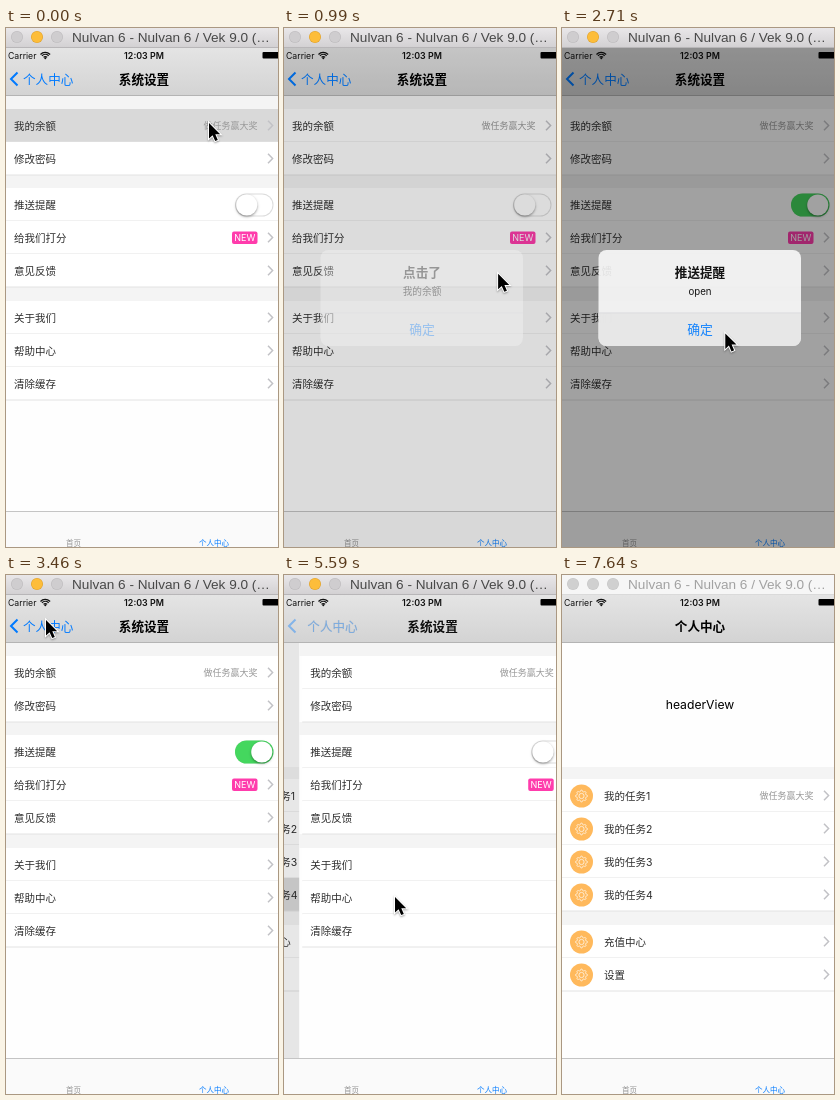
Write an HTML page with a canvas that moves like this. It is 272x519 px and loops after 7660 ms.

```html
<!DOCTYPE html>
<html lang="zh-CN">
<head>
<meta charset="utf-8">
<title>系统设置</title>
<style>
html, body { margin: 0; width: 100%; height: 100%; overflow: hidden; background: #fff; }
canvas { display: block; width: 272px; height: 519px; }
</style>
</head>
<body>
<canvas id="stage"></canvas>
<script>
const W = 272, H = 519, PAGE = 276, MID = 138, LOOP = 7660;
const NAV_END = 68, TAB_TOP = 483, ROW = 33;
const SANS = 'Inter, "Noto Sans CJK SC", "Noto Sans CJK", sans-serif';
const BLUE = '#007aff';

const canvas = document.getElementById('stage');
const ctx = canvas.getContext('2d');
const dpr = window.devicePixelRatio || 1;
canvas.width = W * dpr;
canvas.height = H * dpr;

const clamp = v => Math.max(0, Math.min(1, v));
const smooth = (t, start, length) => {
  const u = clamp((t - start) / length);
  return u * u * (3 - 2 * u);
};
const spring = (t, start) => {
  const curve = k => 1 - (1 + k) * Math.exp(-k);
  return curve(6 * clamp((t - start) / 640)) / curve(6);
};

// Pointer stops: time, x, y
const STOPS = [
  [0, 203, 95], [30, 203, 95], [590, 183, 303], [770, 183, 303],
  [990, 214, 246], [1330, 250, 178], [1540, 250, 178], [1880, 252, 265],
  [2240, 165, 309], [2660, 165, 309], [3400, 40, 45], [3550, 40, 45],
  [4190, 130, 393], [4250, 116, 346], [4340, 97, 321], [4460, 111, 322],
  [5650, 111, 322], [6390, 40, 46], [6450, 40, 46], [7080, 175, 524], [LOOP, 175, 524]
];

function slope(i, axis) {
  const a = STOPS[i - 1], b = STOPS[i], c = STOPS[i + 1];
  if (!a || !c) return 0;
  const still = (p, q) => p[1] === q[1] && p[2] === q[2];
  return still(a, b) || still(b, c) ? 0 : (c[axis] - a[axis]) / (c[0] - a[0]);
}

function pointerAt(t) {
  let i = 0;
  while (i < STOPS.length - 2 && STOPS[i + 1][0] <= t) i++;
  const a = STOPS[i], b = STOPS[i + 1], d = b[0] - a[0], u = (t - a[0]) / d;
  return [1, 2].map(k => {
    const w = u * u * (3 - 2 * u);
    return a[k] + (b[k] - a[k]) * w
      + d * slope(i, k) * u * (1 - u) ** 2 - d * slope(i + 1, k) * u * u * (1 - u);
  });
}

function rect(x, y, w, h, fill) {
  ctx.fillStyle = fill;
  ctx.fillRect(x, y, w, h);
}

function pill(x, y, w, h, r, fill) {
  ctx.beginPath();
  ctx.roundRect(x, y, w, h, r);
  ctx.fillStyle = fill;
  ctx.fill();
}

function disc(x, y, r, fill) {
  ctx.beginPath();
  ctx.arc(x, y, r, 0, Math.PI * 2);
  ctx.fillStyle = fill;
  ctx.fill();
}

function line(points, color, width) {
  ctx.beginPath();
  points.forEach(p => ctx.lineTo(...p));
  ctx.strokeStyle = color;
  ctx.lineWidth = width;
  ctx.stroke();
}

function text(str, x, y, size, color, align = 'left', weight = 400, family = SANS) {
  ctx.font = `${weight} ${size}px ${family}`;
  ctx.textAlign = align;
  ctx.fillStyle = color;
  ctx.fillText(str, x, y);
}

function vertical(y0, y1, from, to) {
  const g = ctx.createLinearGradient(0, y0, 0, y1);
  g.addColorStop(0, from);
  g.addColorStop(1, to);
  return g;
}

function faded(alpha, draw) {
  ctx.save();
  ctx.globalAlpha *= clamp(alpha);
  draw();
  ctx.restore();
}

function windowBar(active) {
  rect(0, 0, W, 20, active ? vertical(0, 20, '#e9e7e9', '#d2d0d2') : '#f6f6f6');
  rect(0, 19, W, 1, active ? '#b8b6b8' : '#dadada');
  [11, 31, 51].forEach((x, i) => {
    const lit = active && i === 1;
    disc(x, 9, 6, lit ? '#e0a32e' : active ? '#bdbbbd' : '#c6c6c6');
    disc(x, 9, 5.4, lit ? '#fdbd3a' : active ? '#cfcdcf' : '#d0d0d0');
  });
  text('Nulvan 6 - Nulvan 6 / Vek 9.0 (…', 66, 14, 13.6, active ? '#484848' : '#a2a2a2',
    'left', 400, '"Liberation Sans", Arial, sans-serif');
}

function statusBar() {
  text('Carrier', 2, 30.5, 8.7, '#111');
  text('12:03 PM', MID, 30.5, 8.9, '#111', 'center', 600);
  [2.4, 4.6, 6.6].forEach(r => {
    ctx.beginPath();
    ctx.arc(39.3, 31, r, -Math.PI * 0.76, -Math.PI * 0.24);
    ctx.strokeStyle = '#111';
    ctx.lineWidth = 1.3;
    ctx.stroke();
  });
  disc(39.3, 30.3, 1, '#111');
  pill(256.5, 24, 20, 6.5, 1, '#000');
}

function navBar(p) {
  rect(0, 20, W, 48, vertical(20, 68, '#e4e4e4', '#d3d3d3'));
  rect(0, 67, W, 1, '#b4b4b4');
  statusBar();
  faded(1 - p, () => text('个人中心', MID - 96 * p, 55.5, 12.6, '#000', 'center', 600));
  faded(p, () => text('系统设置', MID + 160 * (1 - p), 55.5, 12.6, '#000', 'center', 600));
  faded((p - 0.89) / 0.11, () => {
    line([[11.5, 44.5], [5, 51], [11.5, 57.5]], BLUE, 2);
    text('个人中心', 17 + 96 * (1 - p), 55.5, 12.6, BLUE);
  });
}

function tabBar() {
  rect(0, TAB_TOP, W, H - TAB_TOP, '#fafafa');
  rect(0, TAB_TOP, W, 1, '#c4c4c4');
  text('首页', 67.5, 517.5, 7.5, '#929292', 'center');
  text('个人中心', 208, 517.5, 7.5, BLUE, 'center');
}

function gear(x, y) {
  disc(x, y, 11.5, '#ffb95c');
  ctx.beginPath();
  for (let i = 0; i <= 64; i++) {
    const a = i / 64 * Math.PI * 2, r = 5.2 + 0.7 * Math.tanh(3 * Math.cos(8 * a));
    ctx.lineTo(x + r * Math.cos(a), y + r * Math.sin(a));
  }
  ctx.moveTo(x + 2.6, y);
  ctx.arc(x, y, 2.6, 0, Math.PI * 2);
  ctx.strokeStyle = '#fff0dc';
  ctx.lineWidth = 0.9;
  ctx.stroke();
}

function toggle(y, on) {
  pill(229, y - 11.5, 38.5, 23, 11.5, '#dcdcdc');
  faded(1 - on, () => pill(230, y - 10.5, 36.5, 21, 10.5, '#fff'));
  faded(on, () => pill(229, y - 11.5, 38.5, 23, 11.5, '#44d75e'));
  ctx.save();
  ctx.shadowColor = 'rgba(0,0,0,.4)';
  ctx.shadowBlur = 2.5 * dpr;
  ctx.shadowOffsetY = 1.2 * dpr;
  disc(240.8 + 15 * on, y, 10.6, '#fff');
  ctx.restore();
}

// Each group is [top, ...rows]
const HOME = [
  [204, '我的任务1', '我的任务2', '我的任务3', '我的任务4'],
  [350, '充值中心', '设置']
];
const SETTINGS = [
  [81, '我的余额', '修改密码'],
  [160, '推送提醒', '给我们打分', '意见反馈'],
  [273, '关于我们', '帮助中心', '清除缓存']
];

function list(groups, textX, lit, glow, extra) {
  for (const [top, ...rows] of groups) {
    rows.forEach((label, i) => {
      const y = top + i * ROW, mid = y + 16.5;
      rect(0, y, PAGE, ROW, '#fff');
      if (label === lit) faded(glow, () => rect(0, y, PAGE, ROW, '#d9d9d9'));
      rect(0, y + ROW - 0.5, PAGE, 1, '#e4e4e4');
      text(label, textX, mid + 4, 10.5, '#2e2e2e');
      if (!extra(label, mid)) {
        line([[262, mid - 4.7], [266.6, mid], [262, mid + 4.7]], '#c2c2c6', 1.5);
      }
    });
  }
}

const prize = y => text('做任务赢大奖', 251.5, y + 3.5, 9, '#999', 'right');

function homePage(glow) {
  rect(0, NAV_END, PAGE, TAB_TOP - NAV_END, '#fefefe');
  rect(0, 192, PAGE, 12, '#f4f4f4');
  rect(0, 336, PAGE, 14, '#f4f4f4');
  text('headerView', MID, 134, 12.2, '#000', 'center');
  list(HOME, 42, '我的任务4', glow, (label, y) => {
    gear(19.5, y + 0.5);
    if (label === '我的任务1') prize(y);
  });
}

function settingsPage(glow, on) {
  rect(-3, NAV_END, PAGE + 3, TAB_TOP - NAV_END, '#fefefe');
  [[68, 13], [147, 13], [259, 14]].forEach(([y, h]) => rect(-3, y, PAGE + 3, h, '#f4f4f4'));
  list(SETTINGS, 8, '我的余额', glow, (label, y) => {
    if (label === '我的余额') prize(y);
    if (label === '给我们打分') {
      pill(226, y - 6, 25.5, 12.5, 2, '#ff3cac');
      text('NEW', 238.8, y + 3.5, 9, '#fff', 'center');
    }
    if (label === '推送提醒') {
      toggle(y + 0.5, on);
      return true;
    }
  });
}

function pages(t, p) {
  const homeGlow = t < 4880 ? 0 : 1 - smooth(t, 6500, 450);
  const rowGlow = t < 4880 ? 1 - smooth(t, 120, 320) : 0;
  const on = t < 4880 ? smooth(t, 1500, 250) : 0;
  ctx.save();
  ctx.beginPath();
  ctx.rect(0, NAV_END, W, TAB_TOP - NAV_END);
  ctx.clip();
  if (p < 1) {
    ctx.save();
    ctx.translate(-0.3 * PAGE * p, 0);
    homePage(homeGlow);
    ctx.restore();
    rect(0, NAV_END, W, TAB_TOP, `rgba(0,0,0,${0.1 * p})`);
  }
  if (p > 0) {
    ctx.translate(PAGE * (1 - p), 0);
    settingsPage(rowGlow, on);
  }
  ctx.restore();
}

const ALERTS = [
  { title: '点击了', body: '我的余额', open: 120, press: 760, close: 780 },
  { title: '推送提醒', body: 'open', open: 1540, press: 2300, close: 2650 }
];

function alertBox(t, { title, body, open, press, close }) {
  const shown = smooth(t, open, 320), alpha = shown - smooth(t, close, 350);
  if (alpha <= 0) return;
  rect(0, 20, W, H - 20, `rgba(0,0,0,${0.4 * alpha})`);
  faded(alpha, () => {
    const s = 1.2 - 0.2 * shown;
    ctx.translate(MID, 270);
    ctx.scale(s, s);
    ctx.translate(-MID, -270);
    pill(36.5, 222, 202.5, 96, 8, 'rgba(250,250,250,.97)');
    if (t >= press) pill(36.5, 285, 202.5, 33, [0, 0, 8, 8], '#e6e6e6');
    rect(36.5, 284.5, 202.5, 0.8, '#d6d6da');
    text(title, MID, 248.5, 12.6, '#000', 'center', 600);
    text(body, MID, 266.7, 9.7, '#000', 'center');
    text('确定', MID, 306, 12.8, BLUE, 'center');
  });
}

const ARROW = [[0, 0], [0, 15.5], [3.6, 12.2], [6.2, 18], [8.8, 16.9], [6.3, 11.2], [11.2, 11.2]];

function pointer(x, y) {
  ctx.save();
  ctx.translate(x, y);
  ctx.beginPath();
  ARROW.forEach(p => ctx.lineTo(...p));
  ctx.closePath();
  ctx.shadowColor = 'rgba(0,0,0,.35)';
  ctx.shadowBlur = 2 * dpr;
  ctx.shadowOffsetY = dpr;
  ctx.strokeStyle = '#fff';
  ctx.lineWidth = 2;
  ctx.stroke();
  ctx.shadowColor = 'transparent';
  ctx.fillStyle = '#000';
  ctx.fill();
  ctx.restore();
}

function draw(t) {
  const p = t < 4880 ? 1 - spring(t, 3550) : spring(t, 5150) - spring(t, 6440);
  ctx.setTransform(dpr, 0, 0, dpr, 0, 0);
  rect(0, 0, W, H, '#fff');
  pages(t, p);
  navBar(p);
  tabBar();
  ALERTS.forEach(a => alertBox(t, a));
  windowBar(t < 7640);
  if (t < 7080) pointer(...pointerAt(t));
}

const begin = performance.now();
function tick() {
  draw((performance.now() - begin) % LOOP);
  requestAnimationFrame(tick);
}
tick();
</script>
</body>
</html>
```
